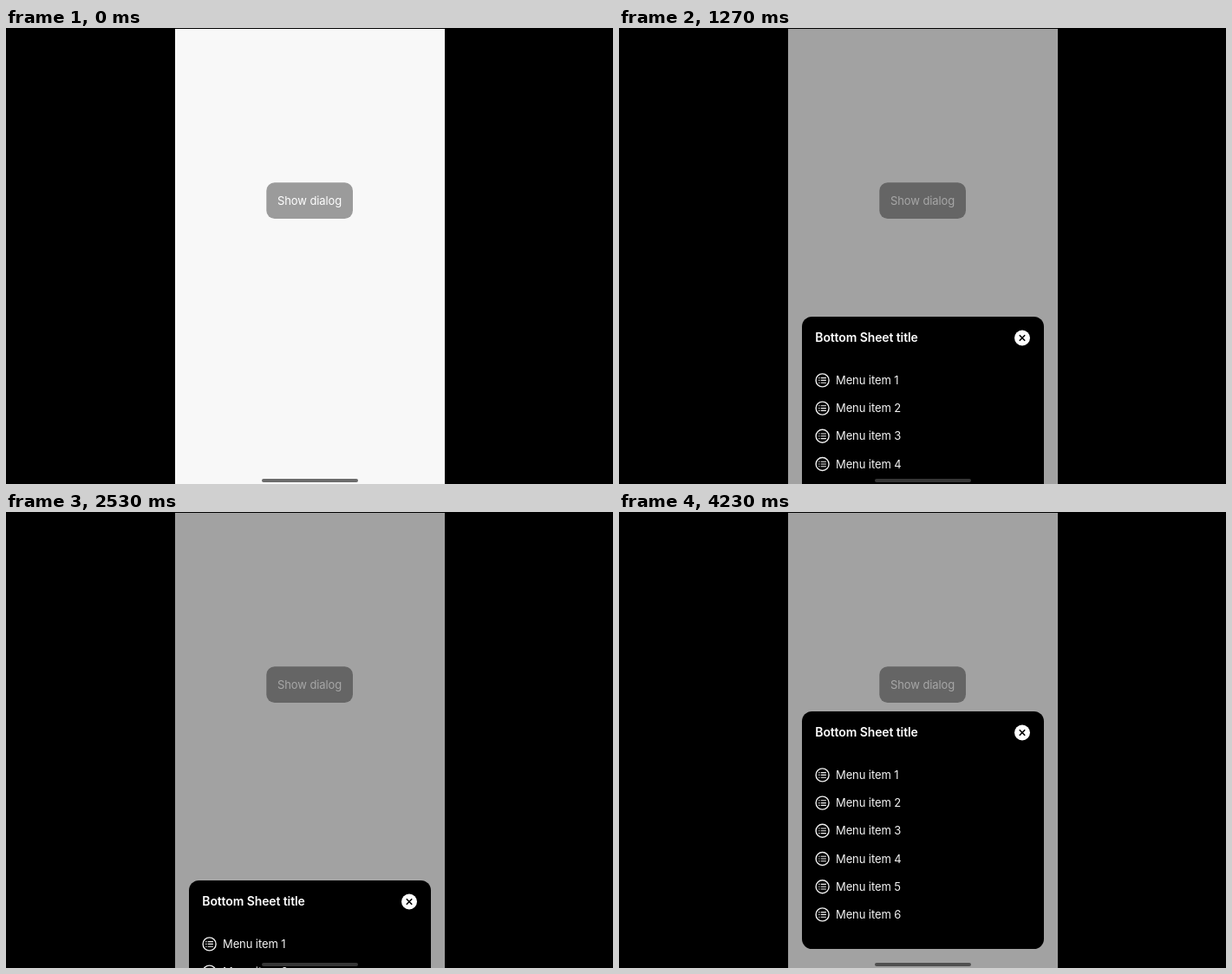
Animation of 700x526 px, one loop 5.51 s. Source, as an HTML page:

```html
<!DOCTYPE html>
<html lang="en">
<head>
<meta charset="utf-8">
<title>Bottom sheet</title>
<style>
  html, body { margin: 0; height: 100%; overflow: hidden; background: #000; }
  svg { display: block; width: 100vw; height: 100vh; }
  text { font: 13px Inter, Roboto, sans-serif; letter-spacing: -.1px; fill: #f4f4f4; }
  .title { font-size: 14px; font-weight: 600; fill: #fff; }
  .line { fill: none; stroke: #f0f0f0; stroke-width: 1.4; }
</style>
</head>
<body>
<svg viewBox="0 0 700 526">
  <rect x="195" y="1" width="311" height="525" fill="#f8f8f8"/>
  <rect x="300.3" y="178.3" width="99.7" height="41.7" rx="9.5" fill="#9b9b9b"/>
  <text id="label" x="313" y="204">Show dialog</text>
  <rect id="shade" x="195" y="1" width="311" height="525" opacity=".35"/>
  <g id="sheet">
    <rect x="211" y="230" width="279" height="274" rx="11.5"/>
    <text class="title" x="226.3" y="259">Bottom Sheet title</text>
    <circle cx="465" cy="254.5" r="9" fill="#fff"/>
    <path d="M461.8 251.3l6.4 6.4m0-6.4l-6.4 6.4" stroke="#000" stroke-width="1.6"/>
    <g id="menu"></g>
  </g>
  <rect id="bar" x="295" y="520" width="111" height="4" rx="2"/>
</svg>
<script>
const $ = id => document.getElementById(id);
const LOOP = 5510;

// [start ms, label state, sheet offset from rest (null = hidden)]
const steps = [
  [0, 'idle', null],
  [570, 'pressed', null],
  [990, 'dimPressed', null],
  [1130, 'dim', null],
  [1270, 'dim', 103],
  [1410, 'dim', 0],
  [2110, 'dim', 19],
  [2250, 'dim', 59],
  [2390, 'dim', 156],
  [2530, 'dim', 195],
  [3100, 'pressed', null],
  [3670, 'dimPressed', null],
  [3810, 'dim', null],
  [3950, 'dim', 0]
];

$('menu').innerHTML = Array.from({ length: 6 }, (_, i) => `
  <g transform="translate(0 ${(i * 32.2).toFixed(1)})">
    <circle class="line" cx="234.6" cy="303.4" r="7.5"/>
    <path class="line" style="stroke-width:1.1"
      d="M230.2 300.6h1.3m1.2 0h6.2M230.2 303.4h1.3m1.2 0h6.2M230.2 306.2h1.3m1.2 0h6.2"/>
    <text x="250" y="308">Menu item ${i + 1}</text>
  </g>`).join('');

function draw(now) {
  const t = now % LOOP;
  const [, state, offset] = steps.findLast(s => s[0] <= t);
  const dim = state.startsWith('dim');
  const pressed = /pressed/i.test(state);
  const open = offset !== null;

  $('label').style.fill = pressed ? '#b0b0b0' : '#fff';
  $('shade').style.display = dim ? '' : 'none';
  $('sheet').style.display = open ? '' : 'none';
  $('sheet').setAttribute('transform', `translate(0 ${offset ?? 0})`);
  $('bar').style.fill = !dim ? '#6c6c6c' : offset > 20 ? '#363636' : '#505050';
  requestAnimationFrame(draw);
}
draw(0);
</script>
</body>
</html>
```
